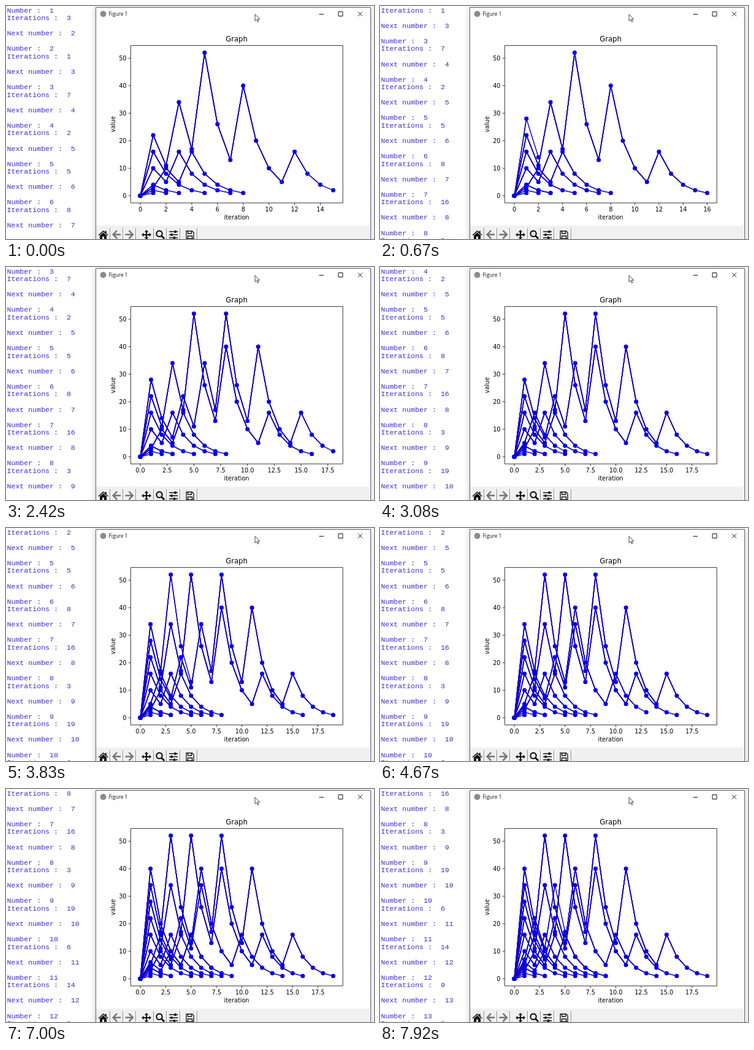
An HTML page with a canvas for the animation above (8 s loop, 600 px wide and 381 px high).

```html
<!DOCTYPE html>
<html lang="en">
<head>
<meta charset="utf-8">
<title>Graph</title>
<style>
  html, body { margin: 0; width: 100%; height: 100%; overflow: hidden; background: #fff; }
  #stage { position: relative; width: 600px; height: 381px; overflow: hidden; background: #fff; }
  #console {
    position: absolute; left: 1.5px; top: 1.7px; margin: 0; width: 140px;
    font: 11.6px/12.55px "Liberation Mono", monospace; color: #3a2cd2;
  }
  #window {
    position: absolute; left: 146px; top: 2px; width: 447px; height: 390px;
    border: 1px solid #6c6272; background: #fff; box-shadow: 0 0 9px #8f84a080;
  }
  svg, canvas { position: absolute; left: 0; top: 0; }
  .plot { font: 9.69px "DejaVu Sans", sans-serif; fill: #000; }
  .mid { text-anchor: middle; }
  .end { text-anchor: end; }
  .axis { stroke: #111; stroke-width: .85; fill: none; }
</style>
</head>
<body>
<div id="stage">
  <pre id="console"></pre>
  <div id="window"></div>
  <svg width="600" height="381">
    <!-- title bar -->
    <circle cx="158.5" cy="13" r="5" fill="#8b8b8b"/>
    <text x="167.5" y="16.3" font-family="Open Sans, sans-serif" font-size="8.3" fill="#111">Figure 1</text>
    <path d="M510.500 13.500h7.500M542 9.500h7v7h-7zM574 9.500l7 7m0-7l-7 7" fill="none" stroke="#111"/>

    <!-- toolbar -->
    <path d="M147 359h446v22h-446z" fill="#f0f0f0"/>
    <path id="edges" fill="none" stroke="#8c8c8c"/>
    <path id="shines" fill="none" stroke="#fff"/>
    <g fill="#111">
      <path d="M150.500 374.500l8-7.500 3 2.800v-2h2.200v4l3 2.700-1 1-7.200-6.500-7 6.500z"/>
      <path d="M153 375.300l5.500-5 5.500 5v5.700h-4v-4h-3v4h-4z"/>
      <path d="M229 366l3.300 3.500h-2.200v3.400h3.400v-2.200l3.500 3.300-3.500 3.300v-2.200h-3.400v3.400h2.200l-3.300 3.500-3.300-3.500h2.200v-3.400h-3.400v2.200l-3.500-3.300 3.500-3.300v2.200h3.400v-3.400h-2.200z"/>
      <path d="M266 368.300h14v1.500h-14zM266 373.300h14v1.500h-14zM266 378.300h14v1.500h-14zM274.500 367h3v4h-3zM268.500 372h3v4h-3zM273 377h3v4h-3z"/>
    </g>
    <path d="M187 373.700h-12m6-6.500l-6.300 6.500 6.300 6.500M194.500 373.700h12m-6-6.500l6.300 6.500-6.300 6.500" fill="none" stroke="#747474" stroke-width="2.500"/>
    <g fill="none" stroke="#111">
      <circle cx="250" cy="372.300" r="4.700" stroke-width="2.200"/>
      <path d="M253.500 375.800l4.700 4.700" stroke-width="2.700"/>
      <path d="M294 368h9.500l2.500 2.500v10h-12zM296.500 368v4h6v-4M296.500 380.500v-4.500h7v4.500" stroke-width="1.300"/>
    </g>

    <!-- axes -->
    <path class="axis" d="M203.300 64.600h345.900v257.400h-345.900z"/>
    <path id="ticks" class="axis"/>
    <g class="plot">
      <text class="mid" x="376" y="57.700" font-size="11.63">Graph</text>
      <text class="mid" x="376" y="349.300">iteration</text>
      <text class="mid" transform="translate(178 193.300) rotate(-90)">value</text>
      <g id="labels"></g>
    </g>
  </svg>
  <canvas id="curves" width="600" height="381"></canvas>
  <svg width="600" height="381">
    <path d="M406 13.500v11l2.600-2.400 1.700 4 1.700-.7-1.700-3.900h3.300z" fill="#fff" stroke="#333" stroke-width=".9"/>
  </svg>
</div>
<script>
const LOOP = 8000, FPS = 12;
const FIRST = 7, LAST = 14, DONE = 15;  // number being plotted at time zero and its points so far
const AXES = { left: 203.3, width: 345.9, bottom: 322, height: 257.4, yMax: 52 };

// Points drawn since the loop began, against tenths of a second.
const PACE = [[0, .3], [17, 16.4], [24, 22.5], [31, 28.5], [47, 42.1], [58, 50.5], [79, 66.4]];

const byId = id => document.getElementById(id);
const ctx = byId('curves').getContext('2d');

function collatz(n) {
  const values = [];
  do {
    n = n % 2 ? 3 * n + 1 : n / 2;
    values.push(n);
  } while (n !== 1);
  return values;
}

const runs = Array.from({ length: LAST }, (_, i) => collatz(i + 1));
const lines = runs.flatMap((run, i) => [
  `Number :  ${i + 1}`, `Iterations :  ${run.length}`, '', `Next number :  ${i + 2}`, ''
]);

function drawButtons() {
  const bars = (xs, shift) => xs.map(x => `M${x + shift} 363v18`).join('');
  const rightEdges = [169.5, 190.5, 211.5, 240.5, 261.5, 283.5, 311.5];
  byId('edges').setAttribute('d', bars(rightEdges, 0));
  byId('shines').setAttribute('d', bars(rightEdges, 1));
}

function progress(step) {
  const i = Math.max(1, PACE.findIndex(([s]) => s >= step));
  const [s0, p0] = PACE[i - 1], [s1, p1] = PACE[i];
  return p0 + (p1 - p0) * (step - s0) / (s1 - s0);
}

function drawConsole(done) {
  let top = 0, rows = 29, end = -DONE;
  for (let n = FIRST; n <= LAST; n++) {
    end += runs[n - 1].length;
    if (done >= end - .8) { top = 5 * (n - FIRST); rows = 29; }
    if (done >= end + .5) { top = 5 * (n - 1) - 29; rows = 31; }
  }
  byId('console').textContent = lines.slice(top, top + rows).join('\n');
}

const yPos = v => AXES.bottom - AXES.height * (v / AXES.yMax + .05) / 1.1;
const xPos = (v, max) => AXES.left + AXES.width * (v / max + .05) / 1.1;

function drawTicks(max) {
  const step = max * 1.1 / 9 > 2 ? 2.5 : 2;
  let path = '', labels = '';
  for (let v = 0; v <= max * 1.05; v += step) {
    const x = xPos(v, max);
    path += `M${x} ${AXES.bottom}v3.4`;
    labels += `<text class="mid" x="${x}" y="335.7">${v.toFixed(step % 1 ? 1 : 0)}</text>`;
  }
  for (let v = 0; v <= 50; v += 10) {
    const y = yPos(v);
    path += `M${AXES.left} ${y}h-3.4`;
    labels += `<text class="end" x="196.5" y="${y + 3.6}">${v}</text>`;
  }
  byId('ticks').setAttribute('d', path);
  byId('labels').innerHTML = labels;
}

function drawLine(points) {
  ctx.beginPath();
  points.forEach(([x, y]) => ctx.lineTo(x, y));
  ctx.stroke();
}

function drawMarkers(points) {
  ctx.beginPath();
  for (const [x, y] of points) {
    ctx.moveTo(x + 3.55, y);
    ctx.arc(x, y, 3.55, 0, 7);
  }
  ctx.fill();
}

function drawGraph(done) {
  let left = Math.floor(done) + DONE;
  const shown = runs.map((run, i) => {
    if (i < FIRST - 1) return run;
    const count = Math.min(left, run.length);
    left -= count;
    return run.slice(0, count);
  });
  const max = Math.max(...shown.map(run => run.length));
  drawTicks(max);
  ctx.clearRect(0, 0, 600, 381);
  ctx.strokeStyle = '#1400c6';
  ctx.fillStyle = '#0400ea';
  ctx.lineWidth = 1.45;
  ctx.lineJoin = 'round';
  for (const run of shown) {
    const points = [0, ...run].map((v, i) => [xPos(i, max), yPos(v)]);
    // Each new point replots the whole run, so older segments grow denser.
    for (let n = Math.max(2, points.length - 3); n <= points.length; n++) {
      drawLine(points.slice(0, n));
    }
    drawMarkers(points);
  }
}

let shownStep = -1;
function render(now) {
  const frame = Math.min(95, Math.floor((now % LOOP + 4) * FPS / 1000));
  const step = frame - Math.floor((frame + 3) / 6);  // every sixth frame repeats
  if (step !== shownStep) {
    shownStep = step;
    const done = progress(step);
    drawConsole(done);
    drawGraph(done);
  }
  requestAnimationFrame(() => render(performance.now()));
}
drawButtons();
render(performance.now());
</script>
</body>
</html>
```
